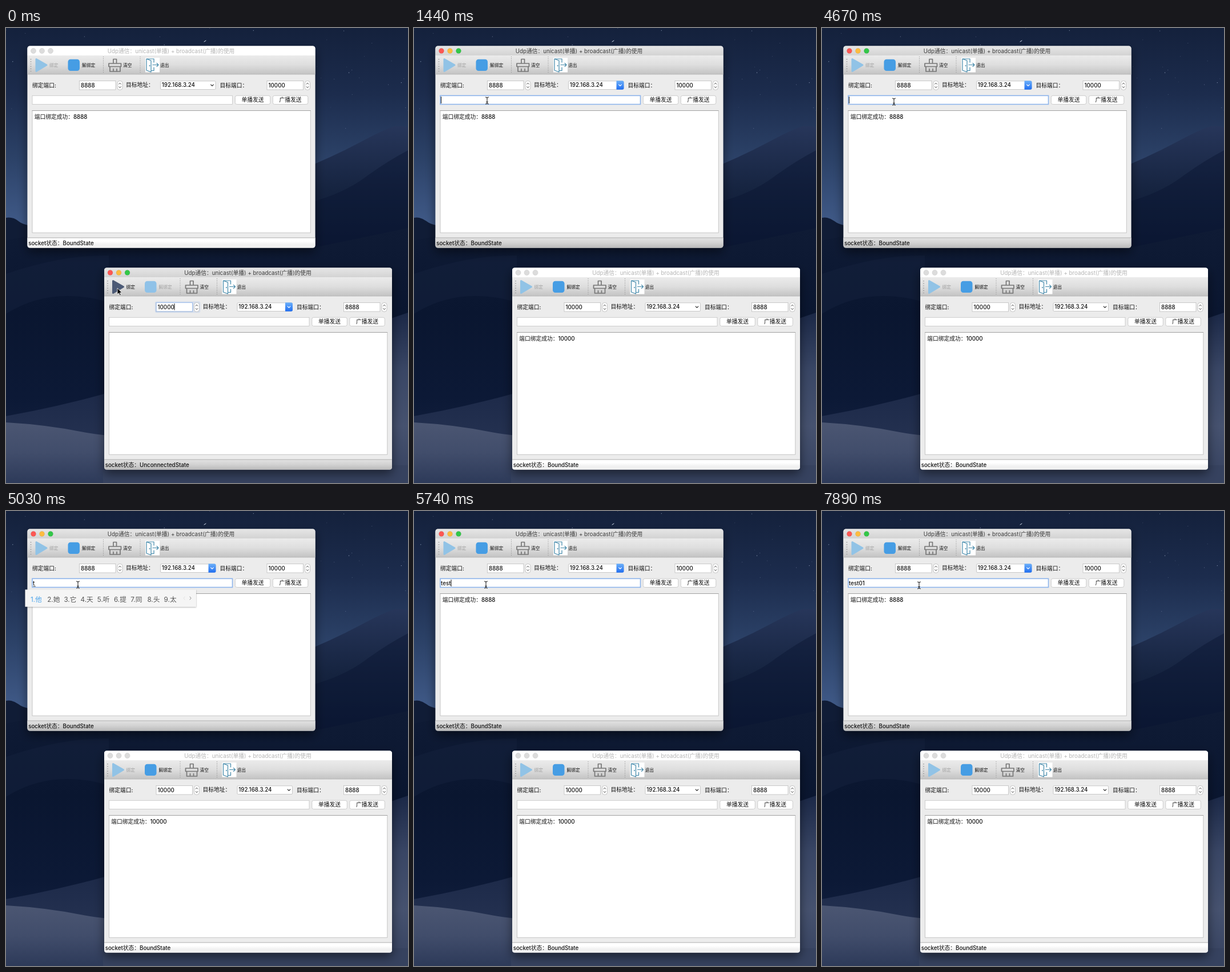
Recreate the animation shown at these times as an HTML page. Size 704 px wide and 796 px high, loop 8 s.

```html
<!DOCTYPE html>
<html lang="zh-CN">
<head>
<meta charset="utf-8">
<style>
  html, body { margin: 0; width: 100%; height: 100%; overflow: hidden; background: #0b1731; }
  svg { display: block; }
  text { font: 500 9.75px Inter, "Noto Sans CJK SC", "Noto Sans CJK", sans-serif; fill: #111; white-space: pre; }
  .tool { font-size: 7.7px; }
  .candidate { font-size: 11.7px; font-weight: 400; fill: #555; }
  .line { fill: none; stroke-linecap: round; stroke-linejoin: round; }
</style>
</head>
<body>
<svg width="704" height="796" viewBox="0 0 704 796">
  <defs id="defs"></defs>
  <g id="desert"></g>
  <g id="scene"></g>
</svg>
<script>
const LOOP = 8000;
const byId = id => document.getElementById(id);

const gradient = (id, ...colors) =>
  `<linearGradient id="${id}" x2="0" y2="1">${colors.map((c, i) =>
    `<stop offset="${i / (colors.length - 1)}" stop-color="${c}"/>`).join('')}</linearGradient>`;

byId('defs').innerHTML =
  gradient('sky', '#14213c', '#1c2c4d', '#2c4268', '#405a88') +
  gradient('farDune', '#27365a', '#15233f', '#091530', '#0a1530') +
  gradient('darkDune', '#0f1b35', '#0a1630', '#0c1936', '#172544') +
  gradient('midDune', '#1d2a49', '#2a3757') +
  gradient('nearDune', '#4b5672', '#414d6b', '#2d3a59') +
  gradient('rightDune', '#1b2847', '#394665', '#46526f', '#35415f') +
  gradient('titleOn', '#e6e6e6', '#d3d3d3') +
  gradient('toolbar', '#ebebeb', '#dedede', '#c3c3c3') +
  gradient('statusOn', '#e2e2e2', '#d2d2d2', '#bababa') +
  gradient('statusOff', '#fff', '#fff', '#f1f1f1', '#f1f1f1') +
  gradient('blueButton', '#6cb0fa', '#1f6df0') +
  `<filter id="windowShadow" x="-20%" y="-20%" width="140%" height="150%">
     <feDropShadow dx="0" dy="7" stdDeviation="9" flood-opacity=".5"/></filter>
   <filter id="popupShadow" x="-5%" y="-20%" width="110%" height="150%">
     <feDropShadow dx="0" dy="1" stdDeviation="1.2" flood-opacity=".35"/></filter>`;

const path = (d, fill) => `<path d="${d}" fill="${fill}"/>`;
const stroke = (d, color, width = 1, extra = '') =>
  `<path class="line" d="${d}" stroke="${color}" stroke-width="${width}" ${extra}/>`;
const box = (x, y, w, h, fill, extra = '') =>
  `<rect x="${x}" y="${y}" width="${w}" height="${h}" fill="${fill}" ${extra}/>`;
const label = (x, y, s, extra = '') => `<text x="${x}" y="${y}" ${extra}>${s}</text>`;

function desert() {
  let seed = 11;
  const random = () => (seed = seed * 16807 % 2147483647) / 2147483647;
  let stars = '';
  for (let i = 0; i < 70; i++) {
    stars += `<circle cx="${random() * 704}" cy="${random() * 180}" r="${.3 + random() * .4}" fill="#b9c8e4" opacity="${.2 + random() * .6}"/>`;
  }
  return box(0, 0, 704, 345, 'url(#sky)') + stars +
    stroke('M347 24L350 22', '#dfe8f7', 1) +
    path('M0 332Q12 330 22 338T60 348V500H0Z', '#101c36') +
    path('M480 262Q560 232 620 200T686 172Q698 171 704 174V520H480Z', 'url(#farDune)') +
    path('M530 306Q590 290 628 262T704 214V440H530Z', '#0a1531" opacity=".45') +
    path('M0 372Q90 350 200 366T540 384L704 350V796H0Z', 'url(#darkDune)') +
    path('M0 430Q100 396 180 398V480Q80 450 0 500Z', '#14213d" opacity=".55') +
    path('M0 679Q90 663 180 638V796H0Z', 'url(#midDune)') +
    path('M0 690Q70 694 130 706T300 716V796H0Z', 'url(#nearDune)') +
    path('M640 520Q680 506 704 498V796H640Z', 'url(#rightDune)') +
    path('M170 765H704V796H170Z', '#36425f');
}

const chevrons = (x, y) =>
  stroke(`M${x - 1.8} ${y - 2.2}l1.8 -2 1.8 2M${x - 1.8} ${y + 2.2}l1.8 2 1.8 -2`, '#444', 1);

const spinBox = (x, value) =>
  box(x, 92.5, 63.5, 15.5, '#fff', 'stroke="#bdbdbd" stroke-width=".8"') +
  label(x + 2.5, 103.6, value) +
  box(x + 66.5, 92.5, 9, 15.8, '#fff', 'rx="4" stroke="#b8b8b8" stroke-width=".8"') +
  chevrons(x + 71, 100.4);

const button = (x, caption) =>
  box(x, 118.3, 61.5, 15.2, '#fff', 'rx="3" stroke="#c2c2c2" stroke-width=".8"') +
  label(x + 30.75, 129.3, caption, 'text-anchor="middle"');

const caretBar = x => box(x, 120, 1, 12, '#111');

function toolbar({ bound, pressed }) {
  const play = bound ? '#91c3e6' : pressed ? '#4c5a76' : '#4a9de0';
  const faded = on => `class="tool" ${on ? '' : 'style="fill:#a2a2a2"'}`;
  const divider = x => stroke(`M${x} 50V79`, '#8a8a8a', 1, 'stroke-dasharray="1 2" style="stroke-linecap:butt"');
  const door = '#3f86a8';
  return box(37.5, 48, 504, 33, 'url(#toolbar)') + stroke('M38 81H541', '#b2b2b2', .8) +
    stroke('M43.5 54V76', '#8c8c8c', 1.5, 'stroke-dasharray="1.2 3" style="stroke-linecap:butt"') +
    `<path d="M53 54.5L71 64.8 53 75.5Z" fill="${play}" stroke="${play}" stroke-width="3" stroke-linejoin="round"/>` +
    label(76, 67.8, '绑定', faded(!bound)) +
    box(108.5, 54.8, 20.5, 20.2, bound ? '#469de4' : '#8fc2e8', 'rx="4.5"') +
    label(133, 67.8, '解绑定', faded(bound)) + divider(170.5) +
    stroke('M188 62V54.5H193.5V62M180 62H201.5V67.5H180ZM182 67.5V76H200V67.5M188 71.5V76M194 71.5V76', '#777', 1.7) +
    label(205, 67.8, '清空', 'class="tool"') + divider(235) +
    box(244, 52, 25, 25.5, '#fff') +
    stroke('M246 54H259V60M259 69V74.5H254M246 54L254 57V77L246 74Z', door, 1.2) +
    stroke('M257 64.5H267M264 61.5L267 64.5 264 67.5', door, 1.1) +
    `<circle cx="251.5" cy="66" r="1" fill="${door}"/>` +
    label(270, 67.8, '退出', 'class="tool"');
}

function appWindow(w) {
  const { dx = 0, dy = 0, active } = w;
  const lights = active ? ['#fc5753', '#fdbc40', '#33c748'] : ['#dcdcdc', '#dcdcdc', '#dcdcdc'];
  const rim = active ? 'rgba(0,0,0,.12)' : '#cdcdcd';
  const field = w.editFocus ? 'stroke="#8db4ec" stroke-width="1.6"' : 'stroke="#c4c4c4" stroke-width=".8"';
  return `<g transform="translate(${dx} ${dy})">` +
    box(37.5, 31.5, 504, 353, '#ececec', `rx="4.5" filter="url(#windowShadow)"`) +
    path('M37.5 48V36Q37.5 31.5 42 31.5H537Q541.5 31.5 541.5 36V48Z', active ? 'url(#titleOn)' : '#fff') +
    lights.map((c, i) => `<circle cx="${48 + 15 * i}" cy="40" r="4.5" fill="${c}" stroke="${rim}" stroke-width=".6"/>`).join('') +
    label(289, 43.8, 'Udp通信：unicast(单播) + broadcast(广播)的使用',
      `text-anchor="middle" style="font-weight:400;fill:${active ? '#3c3c3c' : '#b5b5b5'}"`) +
    toolbar(w) +
    label(46, 103.6, '绑定端口:') +
    (w.portFocus ? box(126.3, 90.2, 79.5, 20, '#d5deec', 'rx="3"') : '') +
    spinBox(128.5, w.port) +
    (w.portFocus ? box(128.5, 92.5, 63.5, 15.5, 'none', 'stroke="#9dbdec" stroke-width="1"') : '') +
    (w.portCaret ? box(160, 94, 1, 11.5, '#111') : '') +
    label(210, 103, '目标地址：') +
    box(270.5, 92.8, 96.5, 14.7, '#fff', 'rx="1.5" stroke="#bdbdbd" stroke-width=".8"') +
    label(272.8, 103, '192.168.3.24') +
    (active ? path('M354.5 92.3H364.5Q367.5 92.3 367.5 95V105Q367.5 107.8 364.5 107.8H354.5Z', 'url(#blueButton)') : '') +
    stroke('M358.7 99L361 101.4 363.3 99', active ? '#fff' : '#333', 1.1) +
    label(374.5, 103.6, '目标端口：') + spinBox(457, w.peer) +
    box(46, 118.3, 350.5, 15.2, '#fff', field) +
    label(47, 129.8, w.typed || '') +
    (w.composing ? box(47.5, 131.3, w.typed.length * 4.1 + .2, .9, '#222') : '') +
    (w.editCaret ? caretBar(w.typed ? 47 + w.typed.length * 4.7 - (w.typed.length < 5 ? 1.3 : 0) : 47) : '') +
    button(401.3, '单播发送') + button(467.3, '广播发送') +
    box(46, 144.5, 487.3, 213.7, '#fff', 'stroke="#c0c0c0" stroke-width=".9"') +
    stroke('M46 144.5H533', '#9c9c9c', .9) +
    (w.bound ? label(49.7, 158.8, '端口绑定成功：' + w.port) : '') +
    path('M37.5 367H541.5V380Q541.5 384.5 537 384.5H42Q37.5 384.5 37.5 380Z', `url(#${active ? 'statusOn' : 'statusOff'})`) +
    stroke('M38 367H541', '#a6a6a6', .9) +
    label(39.2, 379.8, 'socket状态：' + (w.bound ? 'BoundState' : 'UnconnectedState')) + '</g>';
}

function popup(items, xs, right) {
  const more = right - 10;
  return box(33.5, 137.5, right - 33.5, 30, '#f5f5f5', 'filter="url(#popupShadow)"') +
    items.map((s, i) => label(xs[i], 158.7, `${i + 1}.${s}`,
      `class="candidate" ${i ? '' : 'style="fill:#4ba3ea"'}`)).join('') +
    stroke(`M${more - 10} 150l-2 2.5 2 2.5`, '#e2e2e2', 1) +
    stroke(`M${more - 1} 150l2 2.5 -2 2.5`, '#8a8a8a', 1);
}

const shortList = [...'他她它天听提同头太'];
const longList = ['test', '莫岚维沙', '特斯特', '特殊图', '特殊', '特色', '特使', '特设', '特俗'];
const popups = {
  t: () => popup(shortList, shortList.map((_, i) => 43 + i * 29.2), 333),
  test: () => popup(longList, [43, 79, 144, 198, 251, 292.5, 333.5, 374.5, 416], 486),
};

const arrow = (x, y) =>
  `<path transform="translate(${x} ${y})" d="M0 0V11.2L2.6 8.8 4.4 12.9 6.3 12 4.5 8.1H8Z" fill="#000" stroke="#fff" stroke-width=".8"/>`;
const beam = (x, y) =>
  stroke(`M${x - 2.5} ${y - 6}Q${x} ${y - 6} ${x} ${y - 4.5}Q${x} ${y - 6} ${x + 2.5} ${y - 6}M${x} ${y - 5}V${y + 5}M${x - 2.5} ${y + 6}Q${x} ${y + 6} ${x} ${y + 4.5}Q${x} ${y + 6} ${x + 2.5} ${y + 6}M${x - 1.3} ${y + 2.5}H${x + 1.3}`, '#111', 1);

// Value of the last [start, value] step that has begun.
const stepAt = (t, steps) => steps.reduce((value, [start, next]) => t >= start ? next : value, null);

const pointerSteps = [
  [0, arrow(195, 455)], [360, arrow(192, 484)], [720, arrow(146, 234)], [1080, arrow(126.5, 130.5)],
  [1440, beam(128, 127)], [4310, beam(126, 129)], [7890, beam(170, 130)],
];
const typedSteps = [[0, ''], [5030, 't'], [5380, 'test'], [7170, 'test01']];
const caretFlips = [1440, 2160, 2520, 3230, 3590, 3950, 4670, 5030, 5740, 6450, 7170, 7890];

function scene(t) {
  const switched = t >= 1440;
  const typed = stepAt(t, typedSteps);
  const composing = t >= 5030 && t < 5740;
  const left = {
    active: switched, bound: true, port: '8888', peer: '10000', typed, composing,
    editFocus: switched, editCaret: caretFlips.filter(flip => t >= flip).length % 2 === 1,
  };
  const right = {
    dx: 134.5, dy: 388, active: !switched, bound: t >= 360, pressed: t < 360,
    port: '10000', peer: '8888', portFocus: !switched,
    portCaret: !switched && !(t >= 720 && t < 1080),
  };
  const windows = switched ? [right, left] : [left, right];
  return windows.map(appWindow).join('') + (composing ? popups[typed]() : '') + stepAt(t, pointerSteps);
}

byId('desert').innerHTML = desert();
let shown = '';
function frame() {
  const markup = scene(performance.now() % LOOP);
  if (markup !== shown) byId('scene').innerHTML = shown = markup;
  requestAnimationFrame(frame);
}
frame();
</script>
</body>
</html>
```
